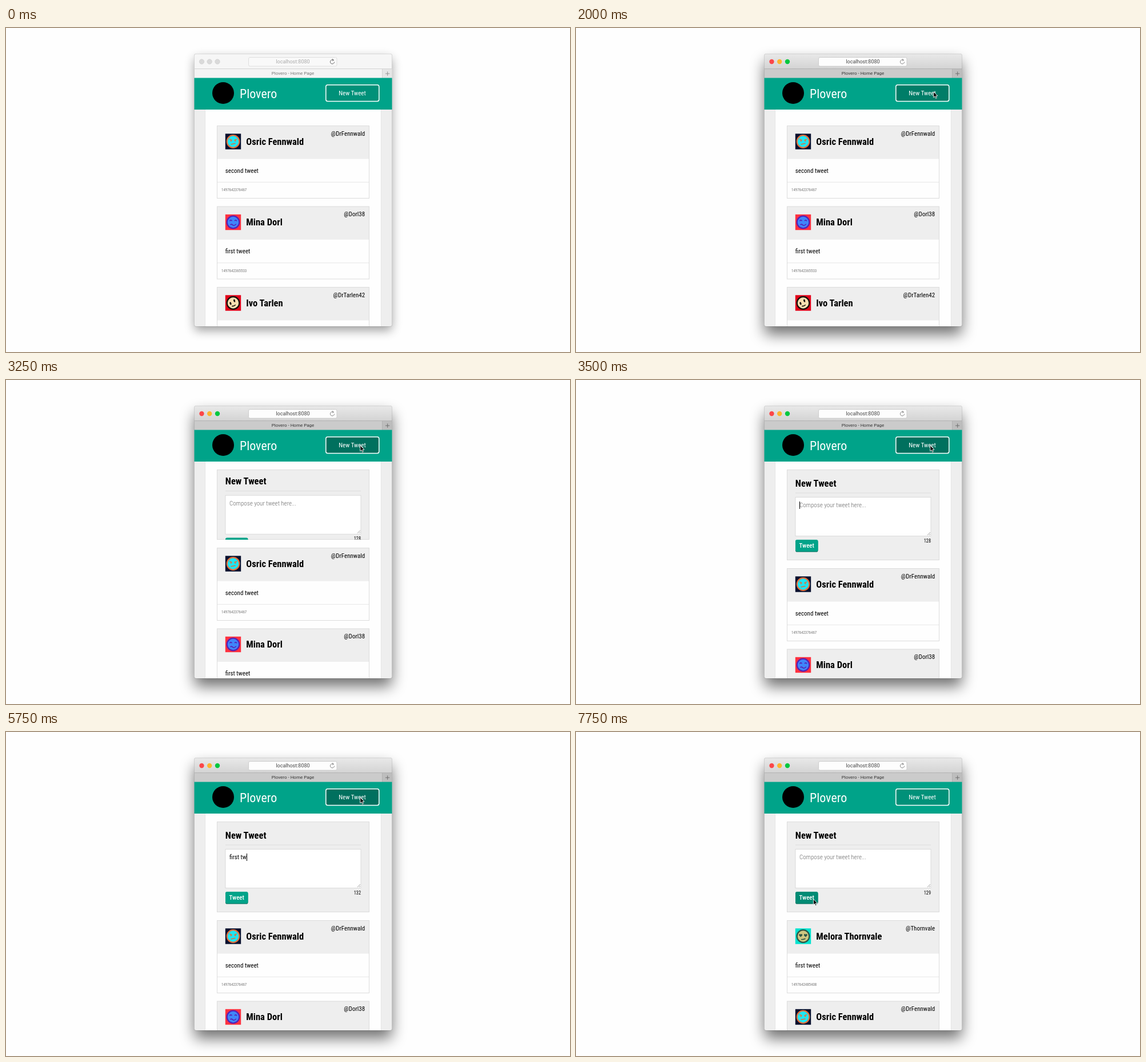
An HTML page for the animation above (8 s loop, 987 by 568 pixels).

```html
<!DOCTYPE html>
<html lang="en">
<head>
<meta charset="utf-8">
<title>Plovero - Home Page</title>
<style>
html, body { margin: 0; width: 100%; height: 100%; overflow: hidden; background: #fefefe; }
svg { display: block; width: 100vw; height: 100vh; }
text { font-family: "Roboto Condensed", Roboto, sans-serif; font-stretch: 75%; white-space: pre; }
text.ui { font-family: Roboto, "Open Sans", sans-serif; font-stretch: 100%; }
</style>
</head>
<body>
<svg id="stage" viewBox="0 0 987 568" xmlns="http://www.w3.org/2000/svg">
  <defs>
    <filter id="far" x="-20%" y="-20%" width="140%" height="140%"><feGaussianBlur stdDeviation="13"/></filter>
    <filter id="near" x="-20%" y="-20%" width="140%" height="140%"><feGaussianBlur stdDeviation="9"/></filter>
    <linearGradient id="bar" x1="0" y1="0" x2="0" y2="1">
      <stop offset="0" stop-color="#e9e9e9"/><stop offset="1" stop-color="#d3d3d3"/>
    </linearGradient>
    <clipPath id="frame"><rect x="329.5" y="45.5" width="346" height="477.5" rx="3.5"/></clipPath>
    <clipPath id="page"><rect x="329" y="143" width="347" height="380"/></clipPath>
    <clipPath id="fold"><rect id="foldBox" x="369" y="157" width="267" height="159"/></clipPath>
  </defs>
</svg>
<script>
const LOOP = 8000;
const GREEN = "#00a389";
const svg = document.getElementById("stage");

function el(parent, name, attrs = {}) {
  const node = document.createElementNS("http://www.w3.org/2000/svg", name);
  set(node, attrs);
  parent.appendChild(node);
  return node;
}
function set(node, attrs) {
  for (const key in attrs) node.setAttribute(key, attrs[key]);
}
function show(node, on) {
  node.style.display = on ? "" : "none";
}
function box(parent, x, y, width, height, fill, more = {}) {
  return el(parent, "rect", { x, y, width, height, fill, ...more });
}
function line(parent, d, stroke, width = 1, more = {}) {
  return el(parent, "path", { d, stroke, fill: "none", "stroke-width": width, ...more });
}

// Without a condensed face, regular letters are narrowed by one common factor.
function narrowFactor() {
  const probe = el(svg, "text", { "font-size": 40 });
  probe.textContent = "New Tweet here";
  const narrow = probe.getComputedTextLength();
  probe.setAttribute("class", "ui");
  const wide = probe.getComputedTextLength();
  probe.remove();
  return narrow < wide * 0.95 ? 1 : 0.88;
}
const narrow = narrowFactor();

function label(parent, x, y, str, size, fill = "#000", weight = 400, anchor = "start") {
  const node = el(parent, "text", {
    transform: `translate(${x} ${y}) scale(${narrow} 1)`,
    "font-size": size, "font-weight": weight, "text-anchor": anchor, fill
  });
  node.textContent = str;
  return node;
}
function uiLabel(parent, x, y, str, size) {
  const node = el(parent, "text", { class: "ui", x, y, "font-size": size, "text-anchor": "middle" });
  node.textContent = str;
  return node;
}

// Window shadow and frame
const farShadow = box(svg, 330, 59, 345, 478, "#000", { rx: 4, opacity: 0.56, filter: "url(#far)" });
const nearShadow = box(svg, 330, 53, 345, 477, "#000", { rx: 4, opacity: 0.38, filter: "url(#near)" });
box(svg, 329, 45, 347, 478.5, "#000", { rx: 4, opacity: 0.2 });
const win = el(svg, "g", { "clip-path": "url(#frame)" });

// Browser bars
const titleBar = box(win, 329, 45, 347, 27, "#f6f6f6");
const tabBar = box(win, 329, 72, 347, 16, "#f4f4f4");
const plusBox = box(win, 659, 72, 17, 16, "#e4e4e4");
const barLines = line(win, "M329 71.5H676M658.5 72V88", "#d0d0d0");
const lights = [342.5, 356.2, 370].map(cx => el(win, "circle", { cx, cy: 59, r: 4.2 }));
const field = box(win, 424.5, 51.5, 154.5, 15.5, "#fff", { rx: 2.5, "stroke-width": 0.8 });
const address = uiLabel(win, 502, 62.2, "localhost:8080", 9);
const reload = line(win, "M573.9 57.2A3.6 3.6 0 1 0 574.6 59.6M570.8 54.2L573.1 55.9L571 57.7", "#555", 0.9);
const tabTitle = uiLabel(win, 502, 82.4, "Plovero - Home Page", 8);
const plus = line(win, "M664 80H671.4M667.7 76.3V83.7", "#777", 0.9);

// Page
box(win, 329, 88, 347, 436, "#eee");
box(win, 348.5, 142, 308, 400, "#fefefe", { stroke: "#e0e0e0", "stroke-width": 0.8 });
const page = el(win, "g", { "clip-path": "url(#page)" });

box(win, 329, 87.5, 347, 55.5, GREEN);
el(win, "circle", { cx: 380, cy: 114, r: 19, fill: "#000" });
label(win, 409, 123, "Plovero", 22, "#fff");
const newButton = box(win, 559.8, 99.7, 93, 28.8, "#009179", { rx: 3.2, stroke: "#fff", "stroke-width": 1.5 });
label(win, 606, 117.6, "New Tweet", 11, "#fff", 400, "middle");

// Compose panel
const panel = el(page, "g", { "clip-path": "url(#fold)" });
const panelBox = box(panel, 369.5, 157.5, 266, 158, "#eee", { stroke: "#dcdcdc" });
const form = el(panel, "g");
label(form, 383.8, 186.8, "New Tweet", 16.5, "#000", 700);
line(form, "M384 198H621", "#d8d8d8", 0.8);
box(form, 384, 205.6, 237, 68, "#fff", { stroke: "#d4d4d4", "stroke-width": 0.8 });
line(form, "M615 272L620 267M618 272L620 270", "#777", 0.7);
const hint = label(form, 391, 223, "Compose your tweet here...", 11, "#666", 300);
const typed = label(form, 391, 223, "", 11);
const caret = line(form, "M.5 213V226", "#000", 1);
box(form, 384, 281, 39.5, 20.6, "#006a58", { rx: 2.8 });
const sendButton = box(form, 384, 280, 39.5, 20.4, GREEN, { rx: 2.8 });
label(form, 403.7, 294, "Tweet", 11, "#fff", 500, "middle");
const count = label(form, 621, 284.6, "128", 8.25, "#000", 400, "end");

// Each face is drawn around its own centre
const faces = {
  frown: {
    back: "#08102e", skin: "#1ee6f4", ink: "#e2703d",
    draw: (g, ink) => line(g, "M-6.5 -4L-2 -2.2M2 -2.2L6.5 -4M-5 -1H-2.6M2.6 -1H5M-4 5L4 3.2", ink, 1.6)
  },
  wavy: {
    back: "#ff313f", skin: "#3f86fa", ink: "#5720b4",
    draw: (g, ink) => line(g, "M-6 -2Q-4.5 -5 -2 -2.4M2.4 -2.4Q4.5 -5 6.4 -2M-5 4.5Q-3 2.6 -1 4.6T3 5T5.5 3.8", ink, 1.6)
  },
  oval: {
    back: "#e30019", skin: "#fbdfb0", ink: "#120c0a",
    draw: (g, ink) => {
      el(g, "ellipse", { cx: -4.6, cy: -0.6, rx: 1.5, ry: 2.6, fill: ink, transform: "rotate(-18)" });
      el(g, "ellipse", { cx: 3.2, cy: -3, rx: 1.5, ry: 2.6, fill: ink, transform: "rotate(-18)" });
      line(g, "M-2.2 5.6Q1.5 6 4.2 3.2", ink, 1.6);
    }
  },
  heart: {
    back: "#00e3cf", skin: "#cfc680", ink: "#2c5546",
    draw: (g, ink) => {
      for (const x of [-4.3, 4.3])
        el(g, "path", { d: `M${x} 1.6l-3 -3.2q0 -2.6 1.8 -2.4l1.2 1l1.2 -1q1.8 -.2 1.8 2.4z`, fill: ink });
      line(g, "M-3.5 5.6Q0 6 4 4.2", ink, 1.5);
    }
  }
};

function avatar(parent, kind) {
  const { back, skin, ink, draw } = faces[kind];
  const g = el(parent, "g", { transform: "translate(397.5 28)" });
  box(g, -13.7, -13.7, 27.4, 27.4, back);
  el(g, "circle", { r: 10.8, fill: skin, stroke: ink, "stroke-width": 2.2 });
  draw(g, ink);
}

function card(name, handle, text, stamp, kind) {
  const g = el(page, "g");
  box(g, 369.5, 0.5, 266, 127, "#fefefe");
  box(g, 369.5, 0.5, 266, 58, "#eee");
  line(g, "M370 99.3H635", "#e6e6e6", 0.9);
  box(g, 369.5, 0.5, 266, 127, "none", { stroke: "#dcdcdc" });
  avatar(g, kind);
  label(g, 420.3, 33.9, name, 16.5, "#000", 700);
  label(g, 628.2, 17.8, handle, 11, "#000", 400, "end");
  label(g, 383.8, 82.5, text, 11);
  label(g, 377, 115.4, stamp, 6.9, "#777");
  return g;
}
const cards = [
  card("Melora Thornvale", "@Thornvale", "first tweet", "1497642485408", "heart"),
  card("Osric Fennwald", "@DrFennwald", "second tweet", "1497642376467", "frown"),
  card("Mina Dorl", "@Dorl38", "first tweet", "1497642365533", "wavy"),
  card("Ivo Tarlen", "@DrTarlen42", "third tweet", "1497642350218", "oval")
];

const cursor = el(svg, "path", {
  d: "M0 0V10L2.3 7.9L3.9 11.6L5.6 10.9L4 7.2H7.2Z",
  fill: "#000", stroke: "#fff", "stroke-width": 0.9, "stroke-linejoin": "round"
});

// Timelines: [start, value...]; the latest entry holds
const cursorPath = [
  [500, 642, 22], [1000, 632.5, 83], [1250, 628, 103], [1500, 625.7, 111.8],
  [2500, 619.8, 114.8], [6500, 609, 132], [6750, 477.5, 255.5],
  [7000, 423.5, 290], [7250, 415.4, 295], [7500, 415.4, 293]
];
const typing = [
  [0, 0], [4500, 1], [4750, 3], [5000, 5], [5250, 6], [5500, 7],
  [5750, 8], [6000, 10], [6250, 11], [7500, 0]
];
const buttonFill = [[0, "#009179"], [2000, "#007d68"], [2250, "#00705e"], [6750, "#009179"]];
const panelHeight = [[0, 0], [3250, 123], [3500, 159]];
const caretOn = [[0, false], [3500, true], [4000, false], [4500, true], [6750, false], [7250, true], [7500, false]];

function at(track, t) {
  return track.filter(key => key[0] <= t).pop();
}

function drawChrome(active) {
  show(farShadow, active);
  show(nearShadow, !active);
  set(titleBar, { fill: active ? "url(#bar)" : "#f6f6f6" });
  set(tabBar, { fill: active ? "#cbcbcb" : "#f4f4f4" });
  set(plusBox, { fill: active ? "#bdbdbd" : "#e6e6e6" });
  set(barLines, { stroke: active ? "#b2b2b2" : "#d4d4d4" });
  set(field, { fill: active ? "#fdfdfd" : "#f9f9f9", stroke: active ? "#c6c6c6" : "#d9d9d9" });
  set(address, { fill: active ? "#444" : "#aaa" });
  set(tabTitle, { fill: active ? "#333" : "#777" });
  set(reload, { stroke: active ? "#777" : "#555" });
  set(plus, { stroke: active ? "#666" : "#888" });
  const colors = active ? ["#fb4749", "#fdb62f", "#00c840"] : ["#dadada", "#dadada", "#dadada"];
  lights.forEach((light, i) => set(light, { fill: colors[i], stroke: active ? "none" : "#cacaca", "stroke-width": 0.6 }));
}

function drawForm(t, height) {
  show(panel, height > 0);
  if (!height) return;
  set(document.getElementById("foldBox"), { height });
  set(panelBox, { height: height - 1 });
  set(form, { transform: `translate(0 ${height < 159 ? -3.4 : 0})` });
  const n = at(typing, t)[1];
  typed.textContent = "first tweet".slice(0, n);
  show(hint, n === 0);
  count.textContent = t < 4500 ? 128 : t < 7500 ? 140 - n : 129;
  const end = n ? typed.getComputedTextLength() * narrow : 0;
  set(caret, { transform: `translate(${Math.round(391 + end)} 0)` });
  show(caret, at(caretOn, t)[1]);
  set(sendButton, { fill: t >= 7250 ? "#008b74" : GREEN });
}

function draw(t) {
  drawChrome(t >= 2000);
  set(newButton, { fill: at(buttonFill, t)[1] });
  const height = at(panelHeight, t)[1];
  drawForm(t, height);

  const top = height ? 171 + height : 171;
  const first = t >= 7750 ? 0 : 1;
  cards.forEach((g, i) => {
    show(g, i >= first);
    set(g, { transform: `translate(0 ${(height ? top : 171) + (i - first) * 141.5})` });
  });

  const spot = at(cursorPath, t);
  show(cursor, !!spot);
  if (spot) set(cursor, { transform: `translate(${spot[1]} ${spot[2]})` });
}

const start = performance.now();
function tick(now) {
  draw(Math.max(0, now - start) % LOOP);
  requestAnimationFrame(tick);
}
draw(0);
requestAnimationFrame(tick);
</script>
</body>
</html>
```
